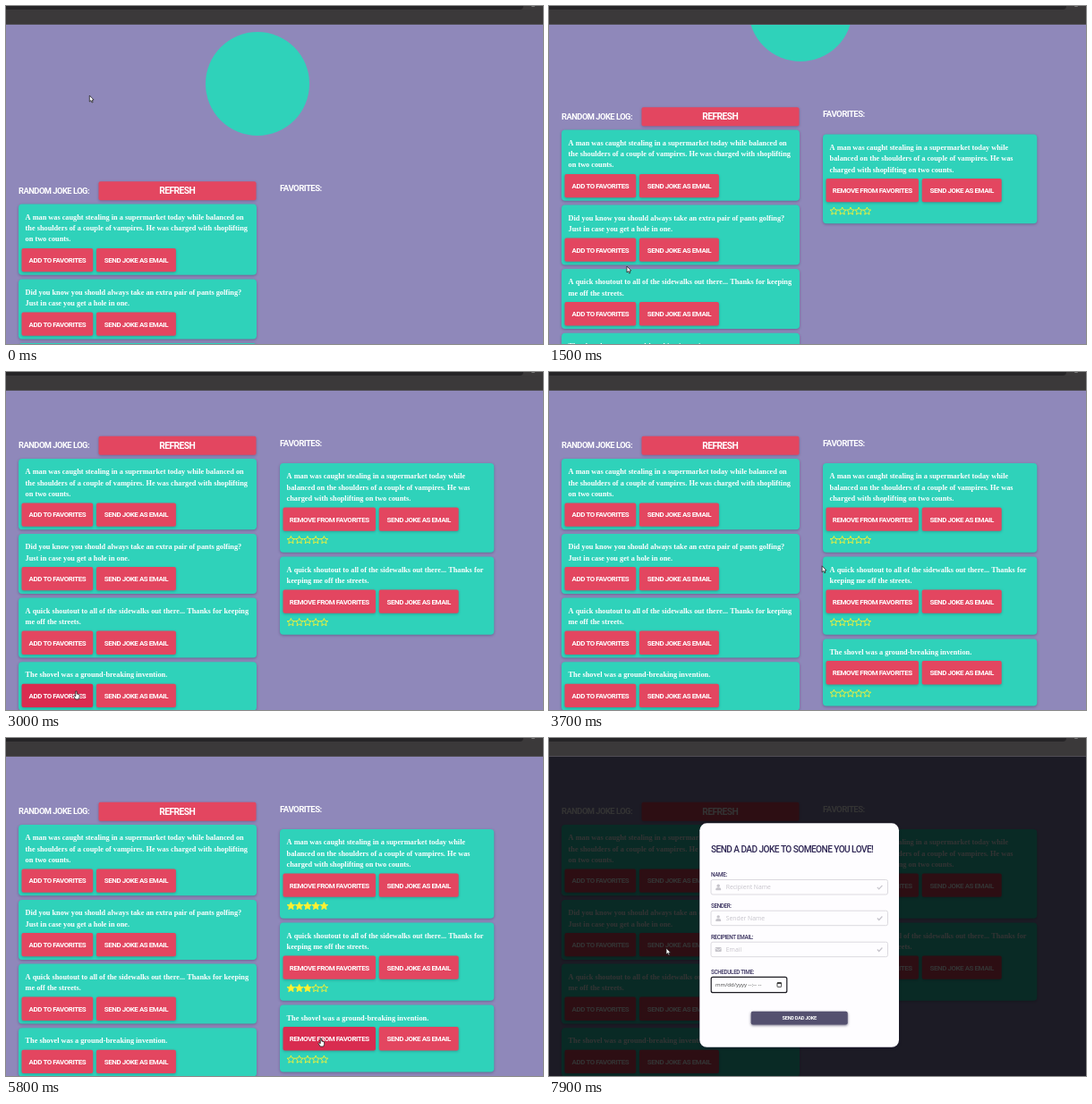
Animation of 600x378 px, one loop 8 s. Source, as an HTML page with a canvas:

```html
<!DOCTYPE html>
<html lang="en">
<head>
<meta charset="utf-8">
<title>Joke log</title>
<style>
html, body { margin: 0; width: 100%; height: 100%; overflow: hidden; background: #8f88ba; }
canvas { display: block; width: 600px; height: 378px; }
</style>
</head>
<body>
<canvas id="stage"></canvas>
<script>
const W = 600, H = 378, LOOP = 8000, BAR = 21;
const canvas = document.getElementById('stage');
const ctx = canvas.getContext('2d');
const dpr = window.devicePixelRatio || 1;
canvas.width = W * dpr;
canvas.height = H * dpr;

const BG = '#8f88ba', TEAL = '#2fd2ba', RED = '#e34660', RED_HOVER = '#d92c50', YELLOW = '#fdf131';
const SANS = 'Roboto, "Liberation Sans", sans-serif';
const SERIF = '"Liberation Serif", "Times New Roman", serif';
const OPEN = '"Open Sans", sans-serif';

const JOKES = {
  vampire: 'A man was caught stealing in a supermarket today while balanced on|the shoulders of a couple of vampires. He was charged with shoplifting|on two counts.',
  golf: 'Did you know you should always take an extra pair of pants golfing?|Just in case you get a hole in one.',
  street: 'A quick shoutout to all of the sidewalks out there... Thanks for keeping|me off the streets.',
  shovel: 'The shovel was a ground-breaking invention.'
};
const LOG = [JOKES.vampire, JOKES.golf, JOKES.street, JOKES.shovel];
const FAVORITES = [
  { text: 'A man was caught stealing in a supermarket today while|balanced on the shoulders of a couple of vampires. He was|charged with shoplifting on two counts.', from: 1000, to: LOOP, stars: 5, rated: 4000 },
  { text: 'A quick shoutout to all of the sidewalks out there... Thanks for|keeping me off the streets.', from: 2000, to: LOOP, stars: 3, rated: 5000 },
  { text: JOKES.shovel, from: 3200, to: 5900, stars: 0, rated: LOOP }
];
const MODAL_AT = 7400;

// time, value(s)
const SCROLL = [[0, 0], [150, 0], [650, 83], [2430, 83], [2850, 124.5]];
const POINTER = [[0, 93.3, 100], [500, 93.3, 100], [850, 72, 203], [1080, 72, 203], [1500, 87, 291],
  [1850, 78.7, 347], [2900, 78.7, 347], [3000, 78.5, 357], [3300, 78.5, 357], [3850, 355, 186],
  [4150, 355, 186], [4600, 347.5, 277], [4850, 336, 278], [5150, 336, 278], [5700, 352, 336],
  [6000, 352, 336], [6600, 121, 237], [7450, 121, 237], [7750, 131, 235]];

function track(keys, t) {
  let i = keys.length - 1;
  while (keys[i][0] > t) i--;
  const a = keys[i], b = keys[i + 1];
  if (!b) return a.slice(1);
  const u = (t - a[0]) / (b[0] - a[0]);
  const e = u * u * (3 - 2 * u);
  return a.slice(1).map((v, k) => v + (b[k + 1] - v) * e);
}

function box(x, y, w, h, r, fill, shadow) {
  ctx.save();
  if (shadow) {
    ctx.shadowColor = `rgba(20,15,50,${shadow})`;
    ctx.shadowBlur = 3 * dpr;
    ctx.shadowOffsetY = dpr;
  }
  ctx.fillStyle = fill;
  ctx.beginPath();
  ctx.roundRect(x, y, w, h, r);
  ctx.fill();
  ctx.restore();
}

function outline(x, y, w, h, r, color, width) {
  ctx.strokeStyle = color;
  ctx.lineWidth = width;
  ctx.beginPath();
  ctx.roundRect(x, y, w, h, r);
  ctx.stroke();
}

function line(points, color, width) {
  ctx.strokeStyle = color;
  ctx.lineWidth = width;
  ctx.beginPath();
  points.forEach(([x, y]) => ctx.lineTo(x, y));
  ctx.stroke();
}

function text(s, x, y, font, color, align = 'left') {
  ctx.font = font;
  ctx.fillStyle = color;
  ctx.textAlign = align;
  ctx.fillText(s, x, y);
}

// Tightly set capitals, centred on y
function caps(s, x, y, size, color, align, weight = 600) {
  ctx.letterSpacing = `${-0.055 * size}px`;
  text(s, x, y + size * 0.36, `${weight} ${size}px ${SANS}`, color, align);
  ctx.letterSpacing = '0px';
}

function star(x, y, full) {
  ctx.beginPath();
  for (let i = 0; i < 10; i++) {
    const a = -Math.PI / 2 + i * Math.PI / 5, r = i % 2 ? 2.1 : 4.5;
    ctx.lineTo(x + r * Math.cos(a), y + r * Math.sin(a));
  }
  ctx.closePath();
  ctx.strokeStyle = ctx.fillStyle = YELLOW;
  ctx.lineWidth = 0.9;
  if (full) ctx.fill();
  ctx.stroke();
}

let pointer, hand;

function over(x, y, w, h) {
  const [px, py] = pointer;
  const hit = px >= x && px <= x + w && py >= y && py <= y + h;
  if (hit) hand = true;
  return hit;
}

function button(label, x, y, w) {
  const hot = over(x, y, w, 26.3);
  box(x, y, w, 26.3, 2, hot ? RED_HOVER : RED, 0.25);
  caps(label, x + w / 2, y + 13.2, 7.95, '#fff', 'center');
}

// Draws a card, returns the y of the next one
function card(x, y, w, joke, label, labelW, rating) {
  const lines = joke.split('|');
  const top = y + 12.4 * (lines.length - 1) + 24.6;
  const bottom = top + 26.3 + (rating === undefined ? 3.6 : 24);
  box(x, y, w, bottom - y, 4, TEAL, 0.3);
  lines.forEach((s, i) => text(s, x + 7.6, y + 17.1 + i * 12.4, `bold 8.27px ${SERIF}`, '#fff'));
  button(label, x + 3.5, top, labelW);
  button('SEND JOKE AS EMAIL', x + labelW + 7.2, top, 89);
  if (rating !== undefined) {
    const sy = top + 36.5;
    over(x + 7, sy - 5, 48, 10);
    for (let i = 0; i < 5; i++) star(x + 12.4 + i * 9.25, sy, i < rating);
  }
  return bottom + 4.7;
}

function page(t) {
  const [scroll] = track(SCROLL, t);
  ctx.fillStyle = BG;
  ctx.fillRect(0, 0, W, H);
  ctx.save();
  ctx.translate(0, -scroll);
  pointer[1] += scroll;
  ctx.fillStyle = TEAL;
  ctx.beginPath();
  ctx.arc(281, 87, 58, 0, 7);
  ctx.fill();
  caps('RANDOM JOKE LOG:', 14, 206.6, 9.35, '#fff', 'left');
  box(103.5, 196.2, 176, 21, 2, RED, 0.25);
  caps('REFRESH', 191.3, 206.6, 10.3, '#fff', 'center');
  caps('FAVORITES:', 306, 203.7, 9.6, '#fff', 'left');
  let y = 221.5;
  for (const joke of LOG) y = card(14, y, 266, joke, 'ADD TO FAVORITES', 79.7);
  y = 226.6;
  for (const f of FAVORITES)
    if (t >= f.from && t < f.to)
      y = card(306, y, 239.3, f.text, 'REMOVE FROM FAVORITES', 103.5, t >= f.rated ? f.stars : 0);
  pointer[1] -= scroll;
  ctx.restore();
}

function browserBar() {
  ctx.fillStyle = '#3b393a';
  ctx.fillRect(0, 0, W, BAR);
  ctx.fillStyle = '#504d55';
  ctx.fillRect(0, BAR - 1, W, 1);
  box(-10, -10, 588, 14, 4, '#262527');
  box(587, -1, 4, 2, 1, '#777');
}

function field(label, hint, y, mail) {
  const grey = '#c6c4cb', mid = y + 8.3;
  caps(label, 181, y - 5.3, 6.3, '#352d5b', 'left', 500);
  outline(181, y, 197.5, 16.5, 2, '#d8d6dc', 0.9);
  text(hint, 197.8, y + 10.9, `6.8px ${OPEN}`, grey);
  ctx.fillStyle = grey;
  if (mail) {
    box(185.7, mid - 2.6, 7, 5.2, 0.8, grey);
    line([[185.7, mid - 1.6], [189.2, mid + 0.8], [192.7, mid - 1.6]], '#fff', 0.7);
  } else {
    ctx.beginPath();
    ctx.arc(189.2, mid - 1.6, 1.7, 0, 7);
    ctx.fill();
    box(186.2, mid + 0.5, 6, 2.9, [2, 2, 0.6, 0.6], grey);
  }
  line([[366.8, mid], [368.7, mid + 2], [372.4, mid - 2]], grey, 1.2);
}

function modal() {
  ctx.fillStyle = 'rgba(0,0,0,0.8)';
  ctx.fillRect(0, BAR, W, H - BAR);
  box(168.3, 95.3, 222.7, 250.5, 8, '#fefdff', 0.5);
  caps('SEND A DAD JOKE TO SOMEONE YOU LOVE!', 181, 124, 10.1, '#2d2553', 'left', 500);
  field('NAME:', 'Recipient Name', 158.5);
  field('SENDER:', 'Sender Name', 193.2);
  field('RECIPIENT EMAIL:', 'Email', 228.2, true);
  caps('SCHEDULED TIME:', 181, 262, 6.3, '#352d5b', 'left', 500);
  outline(181.2, 267.3, 84.6, 17.4, 2, '#1c1b22', 1.2);
  text('mm/dd/yyyy --:-- --', 186, 278.2, `6px ${OPEN}`, '#444');
  outline(255, 273.6, 4.6, 4.8, 0.5, '#222', 0.8);
  line([[255, 274.2], [259.6, 274.2]], '#222', 1.3);
  box(225.7, 305.8, 108, 14.8, 2, '#54506f', 0.6);
  caps('SEND DAD JOKE', 279.7, 313.3, 5.7, '#fff', 'center', 700);
}

function shape(points, x, y) {
  ctx.beginPath();
  points.forEach(([px, py]) => ctx.lineTo(x + px, y + py));
  ctx.closePath();
  ctx.fillStyle = '#fff';
  ctx.strokeStyle = '#222';
  ctx.lineWidth = 0.8;
  ctx.fill();
  ctx.stroke();
}

function cursor() {
  const arrow = [[0, 0], [0, 7], [1.6, 5.6], [2.7, 8], [3.8, 7.5], [2.8, 5.2], [4.8, 5]];
  const finger = [[-0.7, 0], [0.6, 0], [0.7, 3], [3.6, 3.8], [3.6, 6.5], [2.7, 9], [-0.9, 9], [-2.9, 5.6], [-2.2, 4.7], [-0.8, 5.8]];
  shape(hand ? finger : arrow, ...pointer);
}

function draw(t) {
  ctx.setTransform(dpr, 0, 0, dpr, 0, 0);
  pointer = track(POINTER, t);
  hand = false;
  const open = t >= MODAL_AT;
  const at = pointer;
  if (open) pointer = [-99, -99];
  page(t);
  browserBar();
  if (open) modal();
  pointer = at;
  cursor();
}

const start = performance.now();
function tick() {
  draw((performance.now() - start) % LOOP);
  requestAnimationFrame(tick);
}
tick();
</script>
</body>
</html>
```
